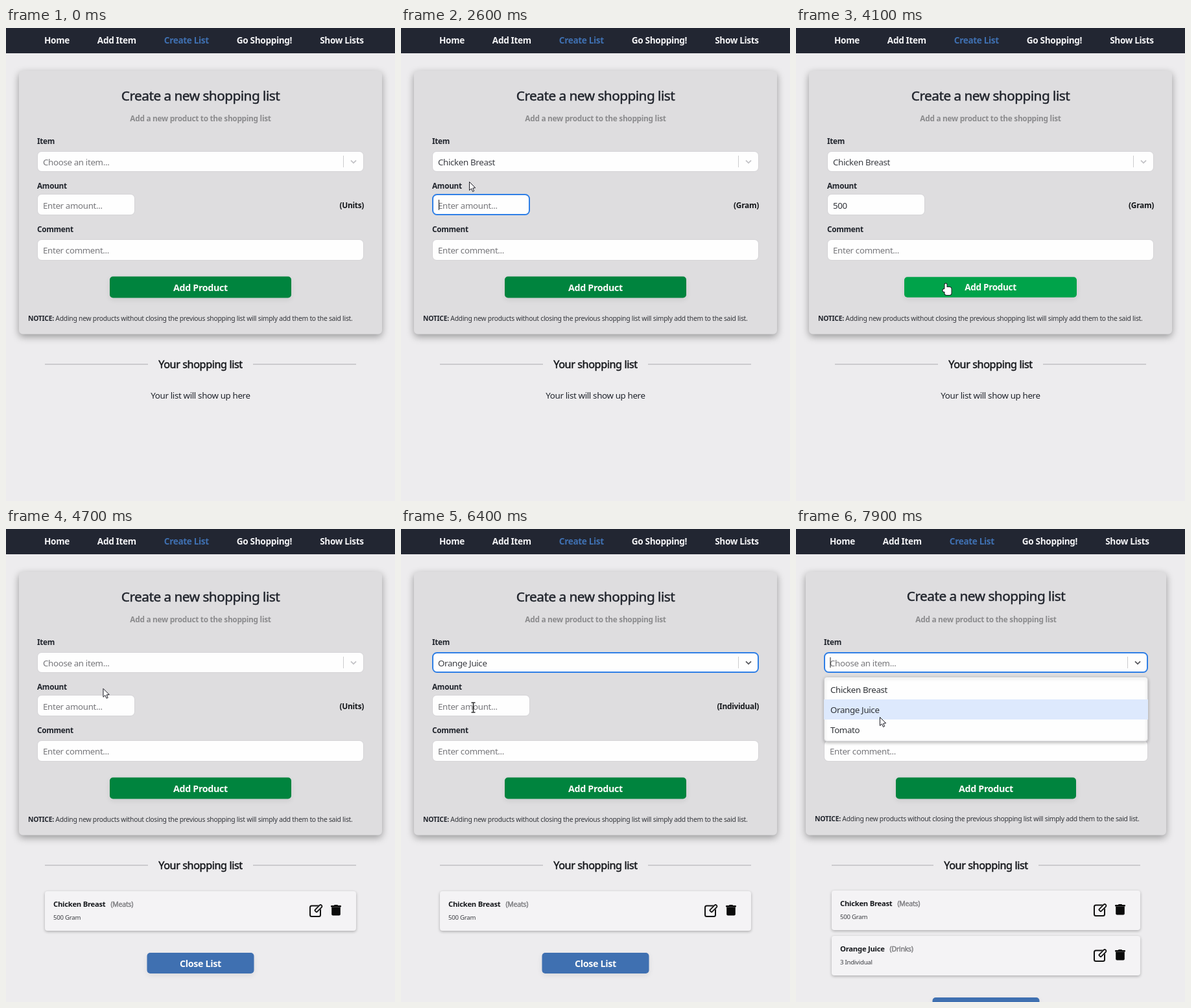
Animation of 600x730 px, one loop 8 s. Source, as an HTML page with a canvas:

```html
<!DOCTYPE html>
<html lang="en">
<head>
<meta charset="utf-8">
<title>Shopping list</title>
<style>
html, body { margin: 0; width: 100%; height: 100%; overflow: hidden; background: #edecee; }
canvas { display: block; width: 600px; height: 730px; }
</style>
</head>
<body>
<canvas id="c" width="600" height="730"></canvas>
<script>
const ctx = document.getElementById('c').getContext('2d');
const LOOP = 8000, MOVE = 350;
const INK = '#20242c', GREY = '#8b8b8d', HINT = '#77777b', BLUE = '#3f70b1', FOCUS = '#2f7fe6';
const OPTIONS = ['Chicken Breast', 'Orange Juice', 'Tomato'];
const ROWS = [['Chicken Breast', '(Meats)', '500 Gram'], ['Orange Juice', '(Drinks)', '3 Individual']];

// Places the pointer visits, and when it sets off for each
const SPOT = {
  select: [130, 210], chicken: [115, 244], amount: [111, 275], rest: [105, 237],
  add: [230, 394], juice: [118, 283], below: [129, 290]
};
const MOVES = [
  [-MOVE, 'select'], [400, 'chicken'], [1150, 'amount'], [1850, 'rest'], [3400, 'add'], [4450, 'select'],
  [4900, 'juice'], [5750, 'amount'], [6700, 'add'], [7250, 'select'], [7540, 'below']
];

const between = (v, a, b) => v >= a && v < b;
const clamp = v => Math.max(0, Math.min(1, v));
const ease = v => v * v * (3 - 2 * v);
const mix = (a, b, k) => a + (b - a) * k;

function pointer(t) {
  let [x, y] = SPOT.select;
  for (const [at, name] of MOVES) {
    const k = ease(clamp((t - at) / MOVE));
    x = mix(x, SPOT[name][0], k);
    y = mix(y, SPOT[name][1], k);
  }
  return { x, y };
}

// Weight 500 is a regular face with a fine outline
function text(s, x, y, size, weight = 400, color = INK, align = 'left') {
  ctx.font = `${weight === 500 ? 400 : weight} ${size}px "Noto Sans", "Open Sans", sans-serif`;
  ctx.letterSpacing = `${-.025 * size}px`;
  ctx.textAlign = align;
  ctx.fillStyle = ctx.strokeStyle = color;
  ctx.fillText(s, x, y);
  if (weight === 500) {
    ctx.lineWidth = .45;
    ctx.strokeText(s, x, y);
  }
  return ctx.measureText(s).width;
}

function box(x, y, w, h, r, fill, stroke, line = 1) {
  ctx.beginPath();
  ctx.roundRect(x, y, w, h, r);
  if (fill) { ctx.fillStyle = fill; ctx.fill(); }
  if (stroke) { ctx.strokeStyle = stroke; ctx.lineWidth = line; ctx.stroke(); }
}

function placed(x, y, draw) {
  ctx.save();
  ctx.translate(x, y);
  draw();
  ctx.restore();
}

function raised(blur, dy, alpha, draw) {
  ctx.save();
  ctx.shadowColor = `rgba(0,0,0,${alpha})`;
  ctx.shadowBlur = blur;
  ctx.shadowOffsetY = dy;
  draw();
  ctx.restore();
}

function line(color, width, ...points) {
  ctx.beginPath();
  points.forEach(([x, y]) => ctx.lineTo(x, y));
  ctx.strokeStyle = color;
  ctx.lineWidth = width;
  ctx.stroke();
}

function caret(x, y, age) {
  if (age % 1000 < 500) line('#222', 1, [x, y - 8], [x, y + 8]);
}

function nav(dx) {
  ctx.fillStyle = '#222632';
  ctx.fillRect(0, 0, 600, 39);
  let x = 59 + dx;
  for (const s of ['Home', 'Add Item', 'Create List', 'Go Shopping!', 'Show Lists'])
    x += text(s, x, 24, 13.6, 600, s === 'Create List' ? BLUE : '#f4f4f6') + 43;
}

function field(x, y, w, h, focus) {
  const b = focus ? 2 : 1;
  box(x + b / 2, y + b / 2, w - b, h - b, 6.5, '#fefefe', focus ? FOCUS : '#d4d3d6', b);
}

function button(cx, cy, w, h, label, color, scale = 1) {
  placed(cx, cy, () => {
    ctx.scale(scale, scale);
    raised(8, 3, .08, () => box(-w / 2, -h / 2, w, h, 5, color));
    text(label, 0, 5.5, 14.3, 600, '#fbfbfb', 'center');
  });
}

function editIcon(x, y) {
  placed(x, y, () => {
    box(1, 2.5, 16, 16.5, 2.5, null, '#111', 2);
    ctx.translate(13, 7.5);
    ctx.rotate(Math.PI / 4);
    box(-3.2, -8.2, 6.4, 15.5, 1, '#f4f3f5');
    box(-2.2, -8, 4.4, 13, [2, 2, 1, 1], null, '#111', 1.8);
  });
}

function trashIcon(x, y) {
  box(x, y + 1, 16, 2.4, 1, '#0b0b0b');
  box(x + 5, y, 6, 3, 1, '#0b0b0b');
  box(x + 1.2, y + 3.4, 13.6, 13.2, [0, 0, 2, 2], '#0b0b0b');
}

function listRow([name, group, amount], x, w, y) {
  raised(4, 1.5, .28, () => box(x, y, w, 61, 4, '#f4f3f5'));
  const end = x + 13 + text(name, x + 13, y + 24, 11.3, 600, '#15171b');
  text(group, end + 8, y + 24, 10.5, 500, '#7d7d80');
  text(amount, x + 13, y + 44, 9.6, 400, '#3a3c41');
  editIcon(x + w - 72, y + 20);
  trashIcon(x + w - 39, y + 21);
}

function menu(x, w, active) {
  raised(5, 2, .26, () => box(x + .5, 228.5, w - 1, 99, 4, '#fefefe', '#cfcfd2'));
  OPTIONS.forEach((s, i) => {
    const y = 232 + 31 * i;
    if (i === active) box(x, y, w, 31, 0, '#dde9fd');
    text(s, x + 10, y + 20.5, 13.3, 400, '#303338');
  });
}

function arrow() {
  ctx.beginPath();
  [[0, 0], [0, 13], [3, 10.3], [5.1, 15], [7.2, 14], [5.2, 9.6], [9.2, 9.2]]
    .forEach(([x, y]) => ctx.lineTo(x, y));
  ctx.closePath();
  ctx.fillStyle = '#fff';
  ctx.fill();
  ctx.strokeStyle = '#1b1b24';
  ctx.lineWidth = 1;
  ctx.stroke();
}

function hand() {
  const palm = edge => {
    box(-1, 0, 3, 12, 1.5, '#fff', edge, 2);
    box(-1, 5.5, 10, 12, 3, '#fff', edge, 2);
    box(-4, 8.5, 5, 4, 2, '#fff', edge, 2);
  };
  palm('#1b1b24');
  palm();
}

function beam() {
  line('#111', 1.3, [0, -7], [0, 7]);
  for (const y of [-7.5, 7.5]) line('#111', 1.3, [-3, y], [3, y]);
}

function state(t) {
  const chosen = between(t, 900, 4400) ? 0 : between(t, 5500, 7300) ? 1 : -1;
  const typed = between(t, 2800, 4400) ? '500'.slice(0, 1 + Math.floor((t - 2800) / 200)) : '';
  return {
    chosen,
    open: between(t, 350, 900) || between(t, 4900, 5500) || t >= 7650,
    amount: between(t, 6800, 7300) ? '3' : typed,
    units: ['(Units)', '(Gram)', '(Individual)'][chosen + 1],
    selectAt: between(t, 300, 1600) ? 300 : between(t, 4800, 6500) ? 4800 : t >= 7600 ? 7600 : 0,
    amountAt: between(t, 1600, 4000) ? 1600 : between(t, 6500, 7150) ? 6500 : 0,
    rows: t < 4400 ? 0 : t < 7300 ? 1 : 2
  };
}

// How far the pointer has swollen the button's hover state, 0 to 1
function hover(t) {
  return Math.max(...MOVES.map(([at, name], i) => name === 'add'
    ? clamp(Math.min(t - at - MOVE + 80, MOVES[i + 1][0] + 250 - t) / 150) : 0));
}

function draw(t) {
  const s = state(t), p = pointer(t);
  const narrow = s.rows > 1 ? 1 : 0;
  const dx = -7 * narrow, cx = 300 + dx, dy = -narrow;
  const left = 48 - 5 * narrow, right = 552 - 9 * narrow, wide = right - left;

  ctx.fillStyle = '#edecee';
  ctx.fillRect(0, 0, 600, 730);
  nav(dx);

  raised(12, 4, .36, () => box(left - 28, 66, wide + 56, 406.5, 6, '#dedddf'));
  text('Create a new shopping list', cx, 111.5 + dy, 20.8, 500, INK, 'center');
  text('Add a new product to the shopping list', cx, 144, 11.85, 600, GREY, 'center');

  text('Item', left, 179, 11.8, 600);
  field(left, 190, wide, 32, s.selectAt);
  const empty = s.chosen < 0;
  text(empty ? 'Choose an item...' : OPTIONS[s.chosen], left + 9, 211.5, 13.3, 400, empty ? HINT : '#3b3d43');
  line('#ccccce', 1, [right - 31.5, 197], [right - 31.5, 215]);
  line(s.selectAt ? '#55565c' : '#c2c2c6', 1.8, [right - 20, 204.3], [right - 16, 208.3], [right - 12, 204.3]);
  if (s.selectAt && empty) caret(left + 10, 206, t - s.selectAt);

  text('Amount', left, 247.5, 11.8, 600);
  field(left, 256, 151, 33, s.amountAt);
  const w = text(s.amount || 'Enter amount...', left + 9, 278.5, 13.3, 400, s.amount ? '#303238' : HINT);
  if (s.amountAt) caret(left + 10.5 + (s.amount ? w : 0), 273, t - s.amountAt);
  text(s.units, right, 277.5, 11.9, 600, '#15171b', 'right');

  text('Comment', left, 315, 11.8, 600);
  field(left, 326, wide, 33, false);
  text('Enter comment...', left + 9, 347.5, 13.3, 400, HINT);

  const h = hover(t);
  const green = `rgb(0,${132 + 31 * h},${62 + 12 * h})`;
  button(cx, 400, 280 - 2 * narrow, 33, 'Add Product', green, 1 - .05 * h);

  const notice = left - 14 + text('NOTICE:', left - 14, 451.5 + dy, 10.35, 600);
  text('Adding new products without closing the previous shopping list will simply add them to the said list.',
    notice + 2.5, 451.5 + dy, 10.35, 400, '#34363b');

  for (const [a, b] of [[left + 12, cx - 81], [cx + 81, right - 12]]) line('#cccbce', 2, [a, 519], [b, 519]);
  text('Your shopping list', cx, 525, 16.2, 500, '#15171b', 'center');

  if (s.rows) {
    ROWS.slice(0, s.rows).forEach((row, i) => listRow(row, left + 12, wide - 24, 559 + 70 * i + dy));
    button(cx, 600 + 70 * s.rows + dy, 165, 32, 'Close List', BLUE);
  } else {
    text('Your list will show up here', cx, 571.5, 13.3, 400, INK, 'center');
  }

  // The last highlighted option stays lit while the pointer sits on its edge
  if (s.open) menu(left, wide, Math.max(0, Math.min(2, Math.floor((p.y - 232) / 31))));

  if (t >= 100) {
    const onButton = Math.abs(p.y - 400) < 17 && Math.abs(p.x - cx) < 140;
    const onField = !s.open && between(p.y, 257, 288) && between(p.x, left, 198);
    placed(p.x + .5, p.y + .5, onButton ? hand : onField ? beam : arrow);
  }
}

const start = performance.now();
function tick(now) {
  draw(Math.max(0, now - start) % LOOP);
  requestAnimationFrame(tick);
}
draw(0);
requestAnimationFrame(tick);
</script>
</body>
</html>
```
